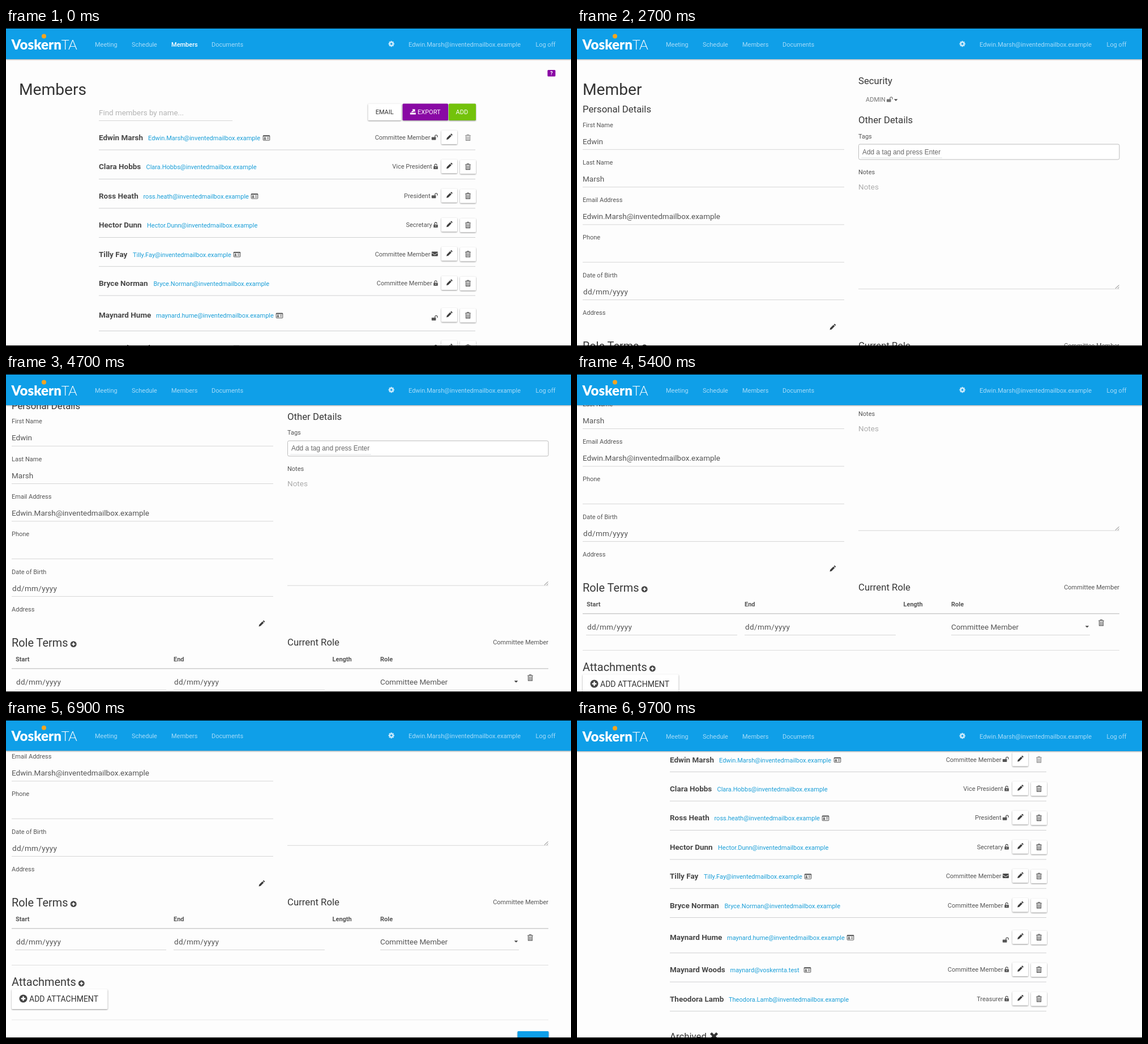
Recreate the animation shown at these times as an HTML page. Size 998 px wide and 561 px high, loop 9800 ms.

```html
<!DOCTYPE html>
<html lang="en">
<head>
<meta charset="utf-8">
<title>Members</title>
<style>
html, body { margin: 0; width: 100%; height: 100%; overflow: hidden; background: #fdfdfd; }
svg { display: block; width: 100vw; height: 100vh; }
text { font-family: Roboto, sans-serif; white-space: pre; }
.btn { filter: drop-shadow(.8px 1px 1px rgba(0, 0, 0, .42)); }
</style>
</head>
<body>
<svg id="stage" viewBox="0 0 998 561"></svg>
<script>
const BLUE = '#0f9fe8', LINK = '#1b9fd8', DARK = '#383838', GREY = '#555', PALE = '#a6dbf8';
const LOOP = 9800, OPEN = 2500, BACK = 8700, LIST_END = 123.5;
const MAIL = '@inventedmailbox.example';
const USER = 'Edwin.Marsh' + MAIL;

// Drawing helpers; each returns SVG markup
const text = (s, x, y, size = 11, fill = GREY, extra = '') =>
  `<text x="${x}" y="${y}" font-size="${size}" fill="${fill}" ${extra}>${s}</text>`;
const bold = (s, x, y, size, fill) => text(s, x, y, size, fill, 'font-weight="700"');
const right = (s, x, y) => text(s, x, y, 11, GREY, 'text-anchor="end"');
const mid = (s, x, y, size, fill, extra = '') => text(s, x, y, size, fill, 'text-anchor="middle" ' + extra);
const date = (x, y) => text('dd/mm/yyyy', x, y, 13.5, GREY, 'letter-spacing=".36"');
const rect = (x, y, w, h, fill, extra = '') =>
  `<rect x="${x}" y="${y}" width="${w}" height="${h}" fill="${fill}" ${extra}/>`;
const rule = (x1, x2, y, color = '#d6d6d6', h = 1) => rect(x1, y - h / 2, x2 - x1, h, color);
const button = (x, y, w, h, fill = '#fff') => rect(x, y, w, h, fill, 'rx="1.5" class="btn"');
const at = (x, y, body, scale = 1) => `<g transform="translate(${x} ${y}) scale(${scale})">${body}</g>`;
const path = (d, fill, extra = '') => `<path d="${d}" fill="${fill}" ${extra}/>`;
const line = (d, color, w) => path(d, 'none', `stroke="${color}" stroke-width="${w}"`);

const icon = {
  pencil: (x, y) => at(x, y, path('M-5 5l.8-3.2 5.6-5.6 2.4 2.4-5.6 5.6zM2.1-4.5l.9-.9q.6-.4 1.2.1l1.1 1.1q.5.6.1 1.2l-.9.9z', '#3c3c3c')),
  trash: (x, y, c = '#5a5a5a') => at(x, y,
    rect(-4.8, -4.4, 9.6, 1.2, c) + line('M-1.8-4.2v-1.2h3.6v1.2', c, 1) +
    line('M-3.5-3v7.9h7v-7.9M-1.3-2v6M1.3-2v6', c, 1.2)),
  open: (x, y, c = GREY) => at(x, y,
    rect(-5.5, -.5, 7.6, 5, c, 'rx=".7"') + line('M.4 0v-2a2 2 0 0 1 4.2 0v1.8', c, 1.3)),
  lock: (x, y) => at(x, y,
    rect(-3.8, -.5, 7.6, 5.3, GREY, 'rx=".7"') + line('M-2 0v-2.2a2 2 0 0 1 4 0v.6', GREY, 1.3) +
    rect(-.5, 1, 1, 2, '#fff')),
  mail: (x, y) => at(x, y,
    rect(-5.5, -4, 11, 8, '#484848', 'rx="1"') + line('M-5.5-2l5.5 3.6 5.5-3.6', '#fff', .9)),
  card: (x, y) => at(x, y,
    rect(-5.8, -4.2, 11.6, 8.4, '#fff', 'rx=".8" stroke="#555"') + rect(-6, -4.5, 12, 1.8, GREY) +
    '<circle cx="-2.6" cy="-.6" r="1.2" fill="#555"/>' + rect(-4.4, .8, 3.6, 1.9, GREY) +
    line('M.8-.8h3.6M.8 1.6h3.6', GREY, 1)),
  plus: (x, y, r) => at(x, y, '<circle r="5.4" fill="#444"/>' + line('M-3 0h6M0-3v6', '#fff', 1.9), r / 5.4),
  caret: (x, y) => at(x, y, path('M-3.3-1.6h6.6l-3.3 3.4z', '#444')),
  gear: (x, y) => at(x, y, [0, 45, 90, 135].map(a =>
    rect(-1.2, -5.2, 2.4, 10.4, '#c8e9fb', `transform="rotate(${a})"`)).join('') +
    `<circle r="3.9" fill="#c8e9fb"/><circle r="1.7" fill="${BLUE}"/>`)
};

// name, mail, mail x, card x, role, lock kind, baseline, rule
const people = [
  ['Edwin Marsh', USER, 251, 460, 'Committee Member', 'open', 198, 215],
  ['Clara Hobbs', 'Clara.Hobbs' + MAIL, 247.5, 0, 'Vice President', 'lock', 249.3, 266.5],
  ['Ross Heath', 'ross.heath' + MAIL, 242.5, 439, 'President', 'open', 300.8, 318],
  ['Hector Dunn', 'Hector.Dunn' + MAIL, 249, 0, 'Secretary', 'lock', 352.2, 369.5],
  ['Tilly Fay', 'Tilly.Fay' + MAIL, 224, 408, 'Committee Member', 'mail', 403.6, 420.7],
  ['Bryce Norman', 'Bryce.Norman' + MAIL, 260.5, 0, 'Committee Member', 'lock', 455, 472],
  ['Maynard Hume', 'maynard.hume' + MAIL, 265, 483, '', 'open', 511.4, 534.4],
  ['Maynard Woods', 'maynard@voskernta.test', 270.5, 407, 'Committee Member', 'lock', 568.5, 585.6],
  ['Theodora Lamb', 'Theodora.Lamb' + MAIL, 268, 0, 'Treasurer', 'lock', 620, 637.2]
];

function personRow([name, mail, mailX, cardX, role, kind, y, ruleY], i) {
  const c = y - 5;
  return bold(name, 164, y, 13.5, '#484848') + text(mail, mailX, y, 11, LINK) +
    (cardX ? icon.card(cardX, c + 1) : '') +
    right(role, kind === 'lock' ? 752.7 : 749.5, y - 1) +
    icon[kind](kind === 'lock' ? 759 : 757.3, c + (role ? 0 : 5)) +
    button(769, c - 12.5, 28, 24.5) + icon.pencil(783, c - 1) +
    (i ? button(802, c - 11.5, 28, 24.5) : '') + icon.trash(816, c + .5, i ? '#555' : '#8c8c8c') +
    rule(164, 829, ruleY, '#cfd0d1');
}

const listPage = () =>
  text('Members', 23, 118, 28.2, '#333') +
  rect(956.5, 74, 14, 11.5, '#8909a4', 'rx="1.5"') + mid('?', 963.5, 83, 9, '#fff', 'font-weight="700"') +
  text('Find members by name...', 164, 153.7, 13.4, '#b4b4b4') + rule(164, 400, 163.5) +
  button(639.5, 133.5, 58.5, 29.5) + mid('EMAIL', 668.7, 152, 11, '#333') +
  button(700.5, 133.5, 80.5, 29.5, '#8909a4') + text('EXPORT', 727, 152, 11, '#fff') +
  at(718.8, 147.5, path('M-5 2h10v3h-10zM-3.5 1l3.6-3.6-1.6-1.6h5.2v5.2l-1.6-1.6-1.8 1.6z', '#fff')) +
  button(782, 133.5, 48, 29.5, '#73c20b') + mid('ADD', 805.3, 152, 11, '#fff') +
  people.map(personRow).join('') +
  text('Archived', 164, 687, 16.75, DARK) +
  at(242, 681.5, line('M-5.5-5.5l11 11M5.5-5.5l-11 11', '#333', 4.4));

const fields = [
  ['First Name', 'Edwin'], ['Last Name', 'Marsh'], ['Email Address', USER],
  ['Phone', ''], ['Date of Birth', null], ['Address', '']
];

function fieldRow([label, value], i) {
  const y = 174.5 + i * 66.3;
  return text(label, 10, y) +
    (value === null ? date(11, y + 30) : text(value, 10, y + 30, 13.5)) +
    (i < 5 ? rule(10, 472, y + 39.8) : '');
}

const memberPage = () =>
  text('Member', 10, 118, 28.2, '#333') + text('Personal Details', 10, 149, 16.75, DARK) +
  fields.map(fieldRow).join('') + icon.pencil(451.5, 527.5) +
  text('Security', 497, 99.3, 16.75, DARK) + text('ADMIN', 510, 130, 11, '#757575') +
  icon.open(552.5, 126, '#757575') + icon.caret(563.2, 127) +
  text('Other Details', 497, 168, 16.75, DARK) + text('Tags', 497, 194.5) +
  rect(497.5, 205, 460.5, 27, '#fff', 'rx="2.5" stroke="#bcbcbc"') +
  text('Add a tag and press Enter', 504, 222.5, 11.9, '#686868', 'style="font-family:Liberation Sans,sans-serif"') +
  rule(502, 645, 229, '#dfe3e4') +
  text('Notes', 497, 258.3) + text('Notes', 497, 284.8, 13.5, '#adadad') +
  rule(497, 958, 460.3) + line('M951 459.5l6.5-6M955 459.5l2.5-2.4', '#777', 1) +
  text('Role Terms', 10, 568.3, 19.9, DARK) + icon.plus(119.2, 563.7, 5.4) +
  text('Current Role', 497, 566, 16.75, DARK) + right('Committee Member', 958, 564.3) +
  [['Start', 17], ['End', 296], ['Length', 576.5], ['Role', 661]].map(([s, x]) => bold(s, x, 594, 11, GREY)).join('') +
  rule(10, 958, 606.8, '#cdcdcd', 1.5) + date(18, 634.7) + date(297, 634.7) +
  text('Committee Member', 661, 634.7, 13.4) + icon.caret(901, 629.8) + icon.trash(926, 623) +
  [[16, 283], [296, 563], [661, 906]].map(([a, b]) => rule(a, b, 644.6)).join('') +
  rule(10, 958, 671.5, '#dedede') +
  text('Attachments', 10, 708.3, 19.9, DARK) + icon.plus(133.3, 703.7, 5.4) +
  button(10, 714, 169.5, 35) + icon.plus(30.5, 730.5, 7) + text('ADD ATTACHMENT', 41, 736.5, 14, '#333') +
  rule(10, 958, 768, '#e6e6e6') +
  button(903.5, 788, 55, 30, BLUE) + mid('BACK', 931, 807, 11, '#fff');

const header = () =>
  rect(0, 0, 998, 55, BLUE, 'style="filter:drop-shadow(0 1px 1px rgba(0,0,0,.35))"') +
  '<circle cx="67" cy="14.5" r="4" fill="#f3a51f"/>' +
  text('Voskern<tspan font-weight="300">TA</tspan>', 9.5, 37.5, 24, '#fff', 'style="font-family:Lato,sans-serif" font-weight="900"') +
  text('Meeting', 157, 32.5, 11, PALE) + text('Schedule', 222, 32.5, 11, PALE) +
  text('Members', 292, 32.5, 11, PALE, 'id="tab"') + text('Documents', 363, 32.5, 11, PALE) +
  icon.gear(680.7, 28) + text(USER, 711, 32.5, 11, PALE) + text('Log off', 935.5, 32.5, 11, PALE);

const $ = id => document.getElementById(id);
$('stage').innerHTML = rect(0, 0, 998, 561, '#fdfdfd') +
  `<g id="list">${listPage()}</g><g id="member">${memberPage()}</g><g id="header">${header()}</g>` +
  rect(0, 0, 998, 1, '#000') + rect(0, 560, 998, 1, '#000');

// Member page scroll: time, offset; joined by a smooth monotone curve
const keys = [[3500, 0], [4100, 26], [4700, 87], [5400, 184], [6900, 239], [8200, 272]];
const slope = i => (keys[i + 1][1] - keys[i][1]) / (keys[i + 1][0] - keys[i][0]);
const tangent = i => i === 0 || i === keys.length - 1 ? 0 :
  2 / (1 / slope(i - 1) + 1 / slope(i));

function scrollAt(t) {
  const n = keys.findIndex(k => k[0] > t);
  if (n === 0) return 0;
  if (n < 0) return keys[keys.length - 1][1];
  const [t0, a] = keys[n - 1], [t1, b] = keys[n], d = t1 - t0, u = (t - t0) / d, v = 1 - u;
  return a * v * v * (1 + 2 * u) + b * u * u * (3 - 2 * u) +
    d * u * v * (v * tangent(n - 1) - u * tangent(n));
}

const shift = (id, y) => $(id).setAttribute('transform', `translate(0 ${y})`);

function draw() {
  const t = performance.now() % LOOP, member = t >= OPEN && t < BACK, y = scrollAt(t);
  $('list').style.display = member ? 'none' : '';
  $('member').style.display = member ? '' : 'none';
  shift('list', t < BACK ? 0 : -LIST_END);
  shift('member', -y);
  shift('header', member && y > 210 ? -.7 : 0);
  $('tab').setAttribute('fill', t < OPEN ? '#fff' : PALE);
  $('tab').setAttribute('font-weight', t < OPEN ? 500 : 400);
  requestAnimationFrame(draw);
}
draw();
</script>
</body>
</html>
```
